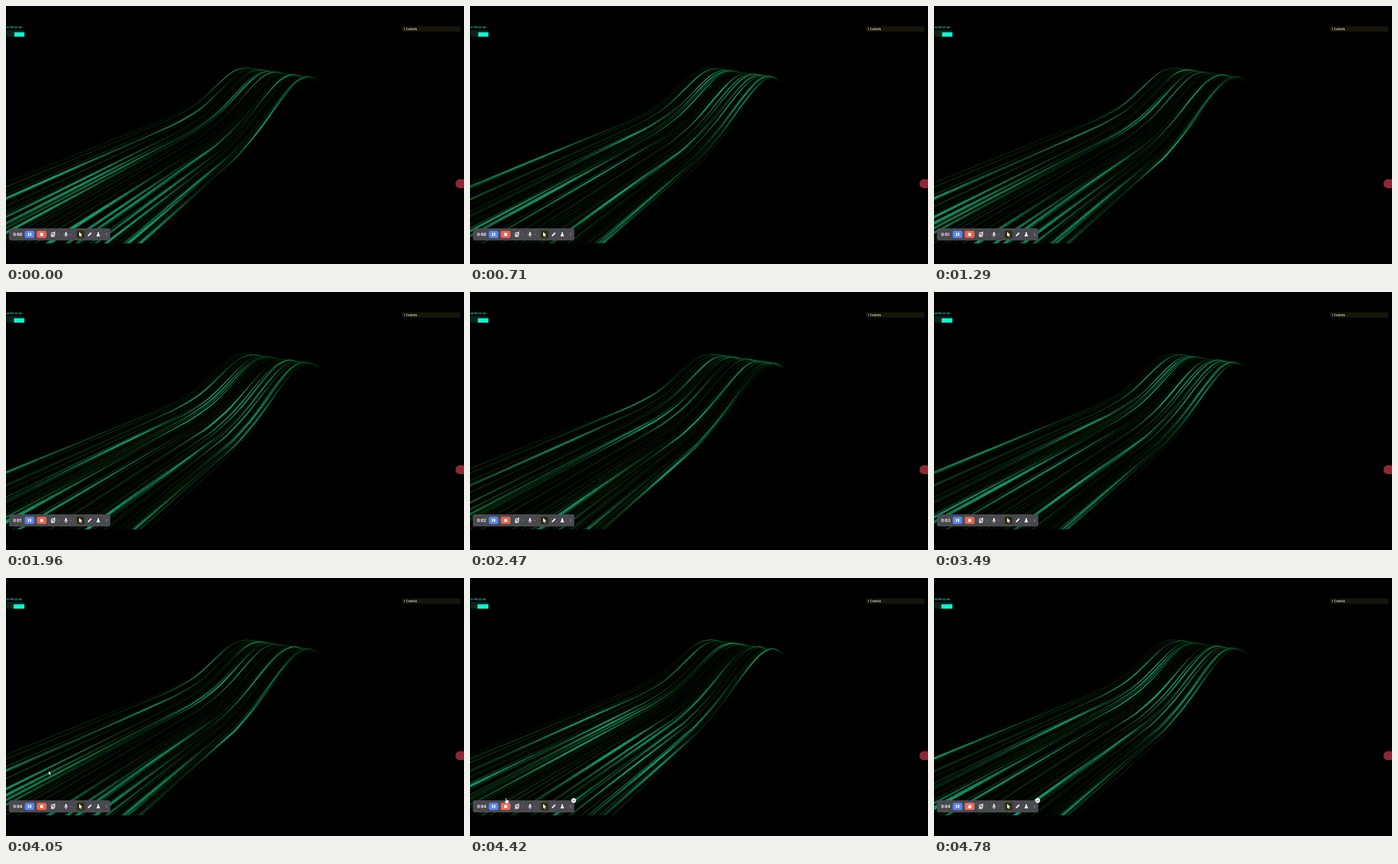
These frames come from a looping animation (720x405 px, 4.8 s). An HTML page with a canvas:

```html
<!DOCTYPE html>
<html lang="en">
<head>
<meta charset="utf-8">
<title>Light trails</title>
<style>
html, body { margin: 0; width: 100%; height: 100%; overflow: hidden; background: #000; }
canvas, svg { position: absolute; left: 0; top: 0; width: 720px; height: 405px; display: block; }
text { font-family: Inter, Arial, sans-serif; }
</style>
</head>
<body>
<canvas id="road" width="720" height="405"></canvas>
<svg viewBox="0 0 720 405">
  <g>
    <text id="fps" x="1" y="34.9" font-size="3.3" font-weight="700" fill="#1fd8b4"></text>
    <rect x="1" y="38" width="28" height="10.4" fill="#02251b"/>
    <rect id="graph" y="41.3" height="6.8" fill="#10f5cf"/>
  </g>
  <g>
    <rect x="623" y="32" width="91.500" height="8.400" fill="#17150a"/>
    <path d="M625.500 34.500l1.500 1.500-1.500 1.500" fill="none" stroke="#e8e5c8" stroke-width=".8"/>
    <text x="628.800" y="37.600" font-size="4.200" font-weight="600" fill="#e8e5c8">Controls</text>
  </g>
  <rect x="706.500" y="272" width="18" height="14" rx="7" fill="#8c2932"/>
  <g id="bar">
    <rect x="4.500" y="349" width="159.500" height="19" rx="3" fill="#49494f"/>
    <text id="clock" x="11.300" y="360.600" font-size="6" font-weight="700" fill="#fff"></text>
    <rect x="29.500" y="352.800" width="15" height="11.400" rx="3" fill="#5b86ee"/>
    <path d="M35.500 356v5M38.700 356v5" stroke="#fff" stroke-width="1.700"/>
    <rect id="stop" x="48.300" y="352.800" width="15.400" height="11.400" rx="3" fill="#ee6050"/>
    <rect x="53.700" y="356.200" width="4.700" height="4.700" rx=".7" fill="#fff"/>
    <g fill="none" stroke="#f2f2f2" stroke-width="1.200" stroke-linecap="round">
      <circle cx="74" cy="358.200" r="2.700"/>
      <path d="M71 361.800l6-7.200M72 362h4"/>
      <path d="M94.300 356v2.600" stroke-width="2.500"/>
      <path d="M91.900 358.500a2.400 2.400 0 0 0 4.800 0M94.300 361v1.500" stroke-width=".8"/>
      <path d="M81.200 358l1 1 1-1M101.200 358l1 1 1-1" stroke="#94949a" stroke-width=".7"/>
      <path d="M159 356.500l-1.700 2 1.700 2" stroke="#b4b4a0" stroke-width=".8"/>
    </g>
    <rect x="111" y="352.500" width="12.500" height="12" rx="2.500" fill="#302e12"/>
    <path d="M115 354.800l5 4.700-2.300.2 1.300 2.600-1.100.5-1.200-2.600-1.700 1.500z" fill="#fff"/>
    <path d="M128.500 361.500l.5-2 4.200-4.200 1.500 1.500-4.200 4.200z" fill="#fff"/>
    <path d="M144.300 355h1.400l.5 3 1.800 3.600h-6l1.800-3.600z" fill="#fff"/>
  </g>
  <g id="close">
    <circle cx="163" cy="349.300" r="3.700" fill="#f4f4ee"/>
    <path d="M161.800 348.100l2.400 2.400m0-2.400l-2.400 2.400" stroke="#444" stroke-width=".8"/>
  </g>
  <path id="arrow" d="M0 0v6l1.400-1.200 1 2.200 1-.5-1-2.100h1.900z" fill="#fff" stroke="#111" stroke-width=".4"/>
  <path id="hand" d="M-1.500-4q.9-.7 1.300.4v2.300l3 .6q.8.300.6 1.200L2.700 4H-1.400L-3.300.8q.2-1 1.800.2z" fill="#fff" stroke="#444" stroke-width=".4"/>
</svg>
<script>
const LOOP = 4800, STEP = LOOP / 144;
const CYCLE = 1400, GAP = 1.3;           // time and depth between two pulses of a lane
const NEAR = 0.45, FAR = 1.6, KNOT = 0.075;
const $ = id => document.getElementById(id);
const ctx = $('road').getContext('2d');

let seed = 41;
function rand() {
  seed = (seed * 1664525 + 1013904223) % 4294967296;
  return seed / 4294967296;
}
const clamp = (v, a, b) => Math.min(b, Math.max(a, v));
const mix = (a, b, p) => a + (b - a) * p;
const ease = p => p * p * (3 - 2 * p);

// Left and right edge of the hill: x, y, x, y
const hill = [
  [245, 178, 365, 244], [280, 161, 392, 212], [302, 146, 413, 184],
  [325, 125, 432, 157], [343, 109, 450, 134], [357, 100, 465, 119],
  [373, 96.5, 480, 112], [386, 98, 491, 115], [393, 101, 499, 122]
];

// Flat part: straight lines towards the vanishing point
const flat = d => hill[0].map((v, i) => {
  const c = i % 2 ? 43 : 585;
  return c + (v - c) / d;
});
const knot = i => i < 0 ? flat(1 + KNOT * i) : hill[Math.min(i, hill.length - 1)];

function edges(d) {
  if (d < 1) return flat(d);
  const s = (d - 1) / KNOT, i = Math.min(Math.floor(s), hill.length - 2), f = s - i;
  const [a, b, c, e] = [-1, 0, 1, 2].map(n => knot(i + n));
  return b.map((v, n) => v + f / 2 * (c[n] - a[n] +
    f * (2 * a[n] - 5 * v + 4 * c[n] - e[n] + f * (3 * (v - c[n]) + e[n] - a[n]))));
}

const COUNT = 72;
const rows = Array.from({ length: COUNT + 1 }, (_, i) => {
  const d = mix(NEAR, FAR, i / COUNT);
  return { d, e: edges(d) };
});

// Bright pulses: lane, depth at the start
const main = [
  [.14, 1.04], [.26, .64], [.36, .53], [.33, .71], [.755, .71], [.67, .91],
  [.9, .6], [.64, .62], [.57, .57], [.35, 1.19], [.95, 1.14],
  [.13, .61], [.24, .29], [.04, .03], [.68, .66], [.96, .58], [.735, .31],
  [.466, .06], [.38, -.02], [.72, .06], [.93, .07], [.3, .63], [.8, .56], [.88, .8]
];
const lanes = main.map(([u, at]) => ({ u, at, amp: mix(.7, 1, rand()), wide: mix(.7, 1.5, rand()) }));
main.forEach(([u, at]) => lanes.push({
  u: clamp(u + mix(-.022, .022, rand()), 0, 1), at: at + mix(-.12, .12, rand()),
  amp: mix(.25, .6, rand()), wide: .4
}));
for (let i = 0; i < 44; i++) {
  lanes.push({ u: (i + rand()) / 44, at: rand() * GAP, amp: mix(.05, .35, rand()), wide: .25 });
}
for (const lane of lanes) {
  lane.pts = rows.map(({ e }) => [mix(e[0], e[2], lane.u), mix(e[1], e[3], lane.u)]);
}

function drawLane(lane, shift) {
  for (let i = 0; i < COUNT; i++) {
    const [x, y] = lane.pts[i], [x2, y2] = lane.pts[i + 1];
    if (x2 < 0 || y2 > 373) continue;
    const d = rows[i].d;
    let off = (d - lane.at - shift) / GAP;
    off = (off - Math.round(off)) * GAP;
    const core = lane.amp * Math.exp(-((off / .17) ** 2));
    const body = Math.exp(-((off / .38) ** 2));
    const alpha = (.06 + .5 * body * (.55 + .45 * lane.amp) + .5 * core) * clamp((FAR - d) / .16, .12, 1);
    const r = mix(20, 18, core), g = mix(92, 162, core), b = mix(14, 118, Math.sqrt(core));
    ctx.strokeStyle = `rgba(${r | 0},${g | 0},${b | 0},${Math.min(1, alpha).toFixed(3)})`;
    ctx.lineWidth = (.75 + 1.5 * core * lane.wide) / d;
    ctx.beginPath();
    ctx.moveTo(x, y);
    ctx.lineTo(x2, y2);
    ctx.stroke();
  }
}

function drawRoad(t) {
  ctx.fillStyle = '#000';
  ctx.fillRect(0, 0, 720, 405);
  ctx.save();
  ctx.beginPath();
  ctx.rect(0, 31, 720, 341.5);
  ctx.clip();
  for (const lane of lanes) drawLane(lane, t / CYCLE * GAP);
  ctx.restore();
}

// Pointer stops: time, x, y
const stops = [[3700, 716, 250], [4000, 67, 303], [4150, 67, 303], [4480, 56, 358], [LOOP, 56, 358]];
function pointer(t) {
  const i = stops.findIndex(s => s[0] > t);
  if (i < 1) return null;
  const [a, b] = [stops[i - 1], stops[i]], p = ease((t - a[0]) / (b[0] - a[0]));
  return [mix(a[1], b[1], p), mix(a[2], b[2], p)];
}

function show(id, on, at) {
  $(id).style.display = on ? '' : 'none';
  if (on && at) $(id).setAttribute('transform', `translate(${at[0]} ${at[1]})`);
}

function render(t) {
  drawRoad(t);
  const sec = Math.floor(t / 1000);
  $('clock').textContent = '0:0' + sec;
  $('fps').textContent = [57, 58, 58, 58, 57][t > 4400 ? 1 : sec] + ' FPS (22-60)';
  const gx = 13.2 - 1.6 * t / LOOP;
  $('graph').setAttribute('x', gx);
  $('graph').setAttribute('width', 29 - gx);
  const at = pointer(t), over = !!at && at[1] > 349;
  show('arrow', at && !over, at);
  show('hand', over, at);
  show('close', over);
  $('stop').setAttribute('fill', over ? '#f4675a' : '#ee6050');
}

const start = performance.now();
function tick() {
  const t = (performance.now() - start) % LOOP;
  render(Math.floor(t / STEP) * STEP);
  requestAnimationFrame(tick);
}
tick();
</script>
</body>
</html>
```
